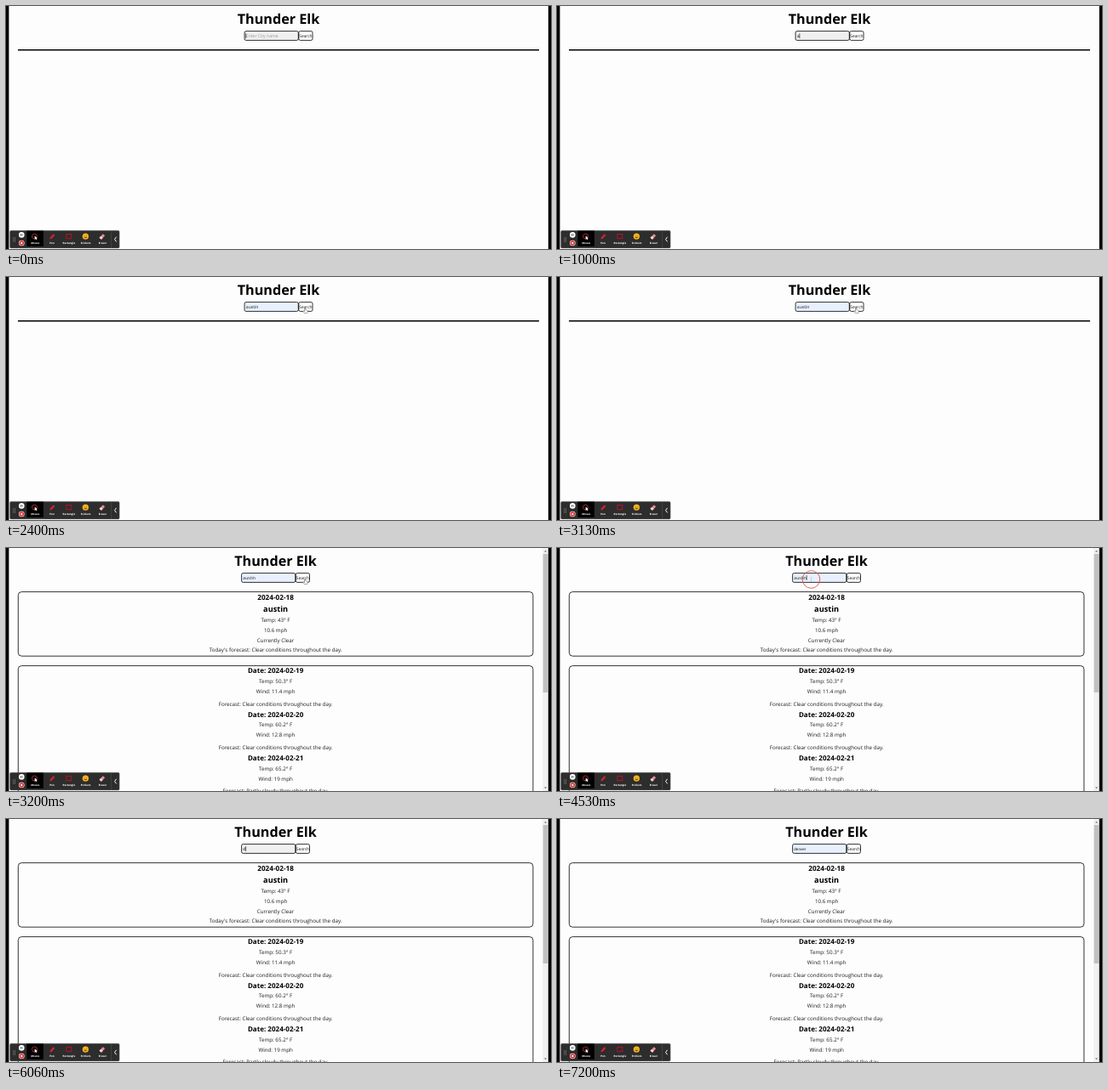
An HTML page for the animation above (8000 ms loop, 640 by 286 pixels).

```html
<!DOCTYPE html>
<html lang="en">
<head>
<meta charset="utf-8">
<title>Weather search</title>
<style>
html, body { margin: 0; width: 100%; height: 100%; overflow: hidden; background: #fdfdfd; }
svg { display: block; width: 640px; height: 286px; }
text { font-family: "Open Sans", "Noto Sans", sans-serif; text-rendering: geometricPrecision; fill: #1c1c1c; }
.mid { text-anchor: middle; }
.bold { font-weight: 700; fill: #000; }
.box { fill: none; stroke: #000; stroke-width: .8; }
.tool { font-weight: 700; fill: #fff; }
</style>
</head>
<body>
<svg viewBox="0 0 640 286">
  <rect width="640" height="286" fill="#fdfdfd"/>
  <g id="page">
    <g id="header"></g>
    <rect id="field" class="box" x="280.1" y="29.6" width="63.2" height="10.8" rx="1.8"/>
    <rect class="box" x="343.8" y="29.6" width="16.2" height="10.8" rx="1.8"/>
    <text class="mid" x="351.9" y="36.9" font-size="4.9">Search</text>
    <text id="value" x="281.8" y="36.9"></text>
    <path id="caret" stroke="#000" stroke-width=".6"/>
  </g>
  <path id="rule" d="M14 51.8H626" stroke="#000" stroke-width="1.6"/>
  <g id="results">
    <rect class="box" x="14.3" y="51.6" width="604.6" height="75.6" rx="4"/>
    <rect class="box" x="14.3" y="138.6" width="604.6" height="200" rx="4"/>
    <g id="forecast"></g>
    <rect x="630" width="7" height="286" fill="#f1f1f1"/>
    <rect x="630.7" y="7" width="5.6" height="163" fill="#c1c1c1"/>
    <path d="M632 4.5h3l-1.5-1.8zM632 281.5h3l-1.5 1.8z" fill="#666"/>
  </g>
  <path d="M0 0H3.4V286H0zM636.8 0H640V286H636.8z"/>
  <g id="toolbar">
    <rect x="4.5" y="264.2" width="128.7" height="20.8" rx="1.5" fill="#2d2d2d" stroke="#777" stroke-width=".4"/>
    <rect x="24.3" y="264.5" width="19.6" height="20" fill="#000"/>
    <path d="M24.3 284H43.9" stroke="#aab4c0" stroke-width=".5"/>
    <path d="M8.7 272.5v5M10.5 272.5v5" stroke="#aaa" stroke-width=".8" stroke-dasharray="1 1"/>
    <circle cx="18.3" cy="269.4" r="3.3" fill="#fff"/>
    <path d="M17.5 268.2v2.4M19.1 268.2v2.4" stroke="#222" stroke-width=".7"/>
    <circle cx="18.3" cy="279" r="3.3" fill="#fff"/>
    <circle cx="18.3" cy="279" r="2.8" fill="#e02b2b"/>
    <rect x="17.3" y="278" width="2" height="2" fill="#fff"/>
    <circle cx="33.5" cy="271" r="3" fill="none" stroke="#c4373c" stroke-width=".8"/>
    <path d="M33.7 270.6v4.4l1.1-.9 1 1.2.7-.5-.9-1.2 1.3-.3z" fill="#fff"/>
    <path d="M51.5 274.5l.6-2.2 3.6-4 1.7 1.5-3.6 4z" fill="#d9232e"/>
    <rect x="70.8" y="268.6" width="6" height="5" fill="none" stroke="#b31520" stroke-width="1"/>
    <circle cx="93.4" cy="271.2" r="3.6" fill="#f6b71e"/>
    <path d="M91.6 272q1.8 2.2 3.6 0zM92.2 269.6v.8M94.6 269.6v.8" fill="#7a4a14" stroke="#7a4a14" stroke-width=".4"/>
    <path d="M109.6 272.7l4.2-4.5 2.4 2-4.2 4.5z" fill="#ec8b94"/>
    <path d="M109.6 272.7l1.6-1.7 2.4 2-1.6 1.7z" fill="#f7d9dc"/>
    <path d="M123.7 264.5V285" stroke="#555" stroke-width=".6"/>
    <path d="M129.6 271.8l-2 2.8 2 2.8" fill="none" stroke="#fff" stroke-width="1"/>
  </g>
  <circle id="ring" r="10.3" fill="none" stroke="#e8504c" stroke-width=".9"/>
  <path id="pointer" stroke-linejoin="round" stroke-width=".5"/>
</svg>
<script>
const LOOP = 8000, LOADED = 3200, BLINK = 530;
const $ = id => document.getElementById(id);

function addText(parent, content, x, y, size, cls = 'mid') {
  const el = document.createElementNS('http://www.w3.org/2000/svg', 'text');
  el.setAttribute('x', x);
  el.setAttribute('y', y);
  el.setAttribute('font-size', size);
  el.setAttribute('class', cls);
  el.textContent = content;
  $(parent).append(el);
}

addText('header', 'Thunder Elk', 320, 21, 16.2, 'mid bold');
const line = (content, y, size = 6.23, cls) => addText('forecast', content, 316.6, y, size, cls);
line('2024-02-18', 60.6, 8.2, 'mid bold');
line('austin', 75, 9.2, 'mid bold');
['Temp: 43° F', '10.6 mph', 'Currently Clear', "Today's forecast: Clear conditions throughout the day."]
  .forEach((s, i) => line(s, 86.7 + i * 11.9));
[['19', '50.3', '11.4', 'Clear conditions'], ['20', '60.2', '12.8', 'Clear conditions'], ['21', '65.2', '19', 'Partly cloudy']]
  .forEach(([day, temp, wind, sky], i) => {
    const y = 147.4 + i * 51.3;
    line(`Date: 2024-02-${day}`, y, 8.05, 'mid bold');
    line(`Temp: ${temp}° F`, y + 11.7);
    line(`Wind: ${wind} mph`, y + 23.7);
    line(`Forecast: ${sky} throughout the day.`, y + 38.1);
  });
['Mouse', 'Pen', 'Rectangle', 'Stickers', 'Eraser']
  .forEach((s, i) => addText('toolbar', s, 34.2 + i * 19.8, 279.6, 3, 'mid tool'));

// Field history: [time, value, mode, caret phase]
const edits = [
  [0, '', 'typed', 330], [1000, 'a', 'typed', 0], [1660, 'austin', 'preview', 0],
  [1860, 'austin', 'filled', 0], [2730, 'austin', 'blur', 0], [4530, 'austin', 'filled', 0],
  ...[5, 4, 3, 2, 1, 0].map((n, i) => [5200 + i * 66, 'austin'.slice(0, n), 'typed', 0]),
  [6060, 'd', 'typed', 0], [7160, 'denver', 'preview', 0]
];
const shapes = {
  arrow: 'M0-2.5v5.2l1.3-1.1 .9 2 .8-.4-.9-1.9h1.6z',
  hand: 'M-.5-3q.6-.6 1 0v2l2.2.6q.8.3.5 1.3l-.6 2.2h-3.2l-1.7-2.3q.1-1 1.8.2z',
  beam: 'M-.7-2.2h1.4M0-2.2v4.4M-.7 2.2h1.4'
};

function travel(t, start, end, from, to) {
  const k = Math.min(1, Math.max(0, (t - start) / (end - start))), e = k * k * (3 - 2 * k);
  return from.map((v, i) => v + (to[i] - v) * e);
}
const show = (id, on) => $(id).setAttribute('visibility', on ? 'visible' : 'hidden');

function drawField(t) {
  const [since, value, mode, phase] = edits.findLast(e => e[0] <= t);
  const preview = mode === 'preview', text = $('value');
  text.textContent = value || 'Enter City name';
  text.style.fill = value ? '#1c1c1c' : '#999';
  text.style.fontFamily = preview ? '"Liberation Sans", sans-serif' : '';
  text.setAttribute('font-size', preview ? 4.6 : 5.1);
  $('field').style.fill = mode === 'typed' ? '#f0f0f0' : '#e8f0fe';
  const x = 282 + (value ? text.getComputedTextLength() : -.3);
  $('caret').setAttribute('d', `M${x} 32.2v5.8`);
  show('caret', !preview && mode !== 'blur' && Math.floor((t - since + phase) / BLINK) % 2 === 0);
}

function drawPointer(t) {
  const [x, y] = t < 3500
    ? travel(t, 1930, 2400, [330, 47], [351, 39.5])
    : travel(t, 3800, 4000, [351, 39.5], [298.5, 37]);
  const kind = t < 2300 ? 'arrow' : t < 3860 ? 'hand' : 'beam';
  const pointer = $('pointer');
  pointer.setAttribute('d', shapes[kind]);
  pointer.setAttribute('transform', `translate(${x} ${y})`);
  pointer.setAttribute('fill', kind === 'beam' ? 'none' : '#fff');
  pointer.setAttribute('stroke', kind === 'beam' ? '#aab' : '#555');
  show('pointer', t >= 1860 && t < 5200);

  const age = t - (t < 3500 ? 2730 : 4530);
  $('ring').setAttribute('transform', `translate(${x} ${y})`);
  $('ring').setAttribute('opacity', Math.max(0, Math.min(1, 2 - age / 135)));
  show('ring', age >= 0 && age < 270);
}

function draw(now) {
  const t = now % LOOP, loaded = t >= LOADED;
  $('page').setAttribute('transform', `translate(${loaded ? -3.5 : 0} 0)`);
  show('rule', !loaded);
  show('results', loaded);
  drawField(t);
  drawPointer(t);
  requestAnimationFrame(draw);
}
draw(0);
</script>
</body>
</html>
```
